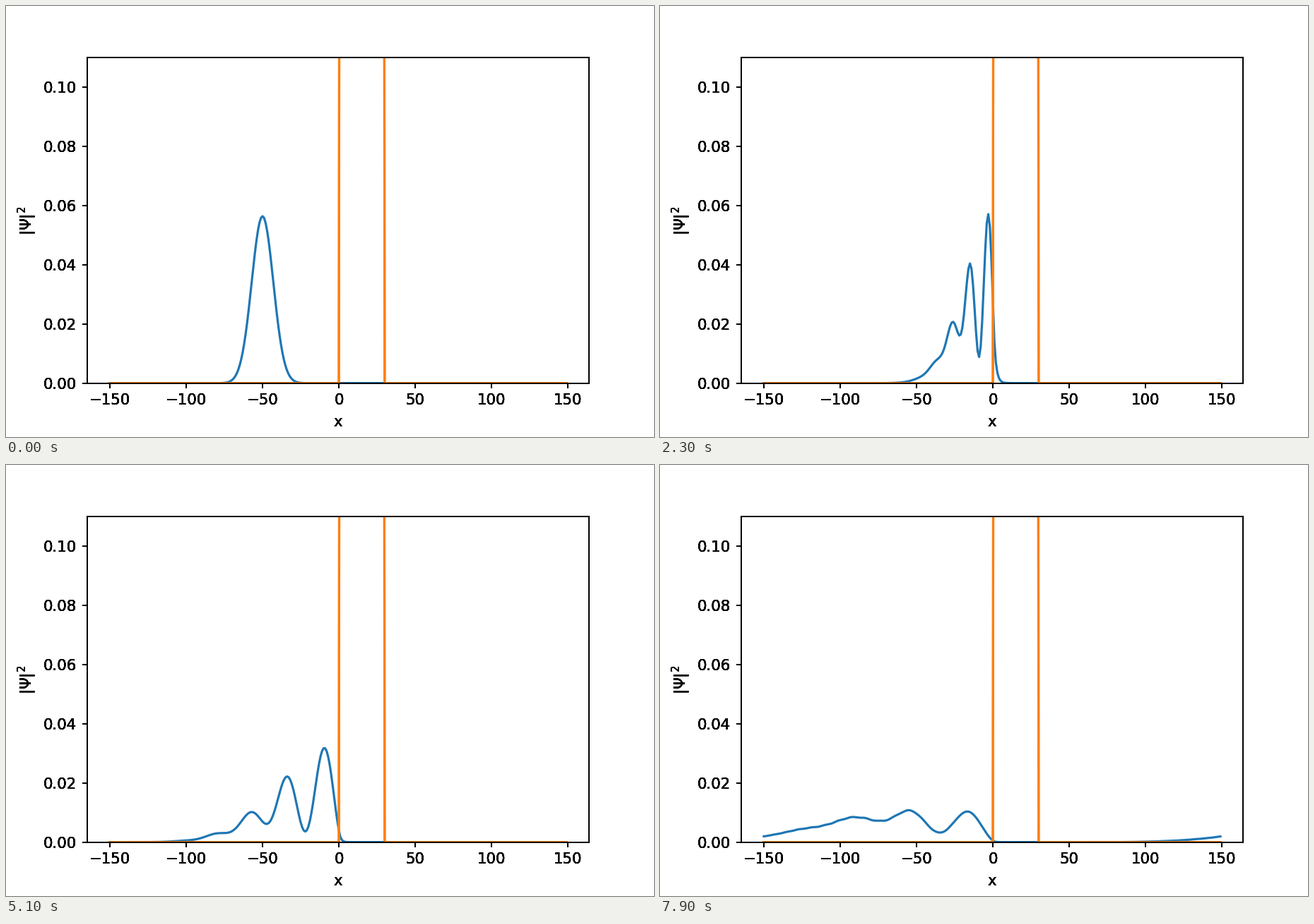
A matplotlib script that plays this animation: 917 px wide and 611 px high, repeating every 8 s.

```python
"""Gaussian wave packet bouncing off a square potential barrier."""
import numpy as np
import matplotlib.pyplot as plt
from matplotlib.animation import FuncAnimation

W, H = 917, 611
DPI = W / 6
FRAMES, INTERVAL = 80, 100
LAYERS = 6  # stacked axes give the heavy text and frame

# Units with hbar = m = 1
X0, SIGMA, K0 = -50, 10, 0.1885
LEFT, RIGHT, V0 = 0, 30, 0.1
V_SCALE = 5  # the drawn barrier rises past the top of the axes
DT = 8.55  # simulated time per frame

x = np.arange(-150, 150)
n = len(x)
barrier = np.where((x > LEFT) & (x < RIGHT), V0, 0.0)


def hamiltonian():
    """Finite-difference Hamiltonian on a periodic grid."""
    eye = np.eye(n)
    kinetic = eye - 0.5 * (np.roll(eye, 1, axis=0) + np.roll(eye, -1, axis=0))
    return kinetic + np.diag(barrier)


energy, modes = np.linalg.eigh(hamiltonian())
psi0 = np.exp(-(x - X0) ** 2 / (2 * SIGMA**2) + 1j * K0 * x)
psi0 /= np.linalg.norm(psi0)
coef = modes.T @ psi0


def density(t):
    return np.abs(modes @ (np.exp(-1j * energy * t) * coef)) ** 2


fig = plt.figure(figsize=((W + 1e-6) / DPI, (H + 1e-6) / DPI), dpi=DPI,
                 facecolor="white")


def add_axes(name):
    ax = fig.add_axes((0.125, 0.125, 0.775, 0.755), label=name)
    margin = 0.05 * (x[-1] - x[0])
    ax.set_xlim(x[0] - margin, x[-1] + margin)
    ax.set_ylim(0, 0.11)
    ax.set_xlabel("x", labelpad=5)
    ax.set_ylabel(r"$|\Psi|^2$", labelpad=3.3)
    ax.patch.set_visible(False)
    return ax


layers = [add_axes(f"layer {i}") for i in range(LAYERS)]
(curve,) = layers[0].plot(x, density(0), color="C0", lw=1.5)
for ax in layers[:2]:
    ax.plot(x, V_SCALE * barrier, color="C1", lw=1.5)


def update(i):
    curve.set_ydata(density(i * DT))
    return (curve,)


anim = FuncAnimation(fig, update, frames=FRAMES, interval=INTERVAL,
                     repeat=True, repeat_delay=0)
plt.show()
```
